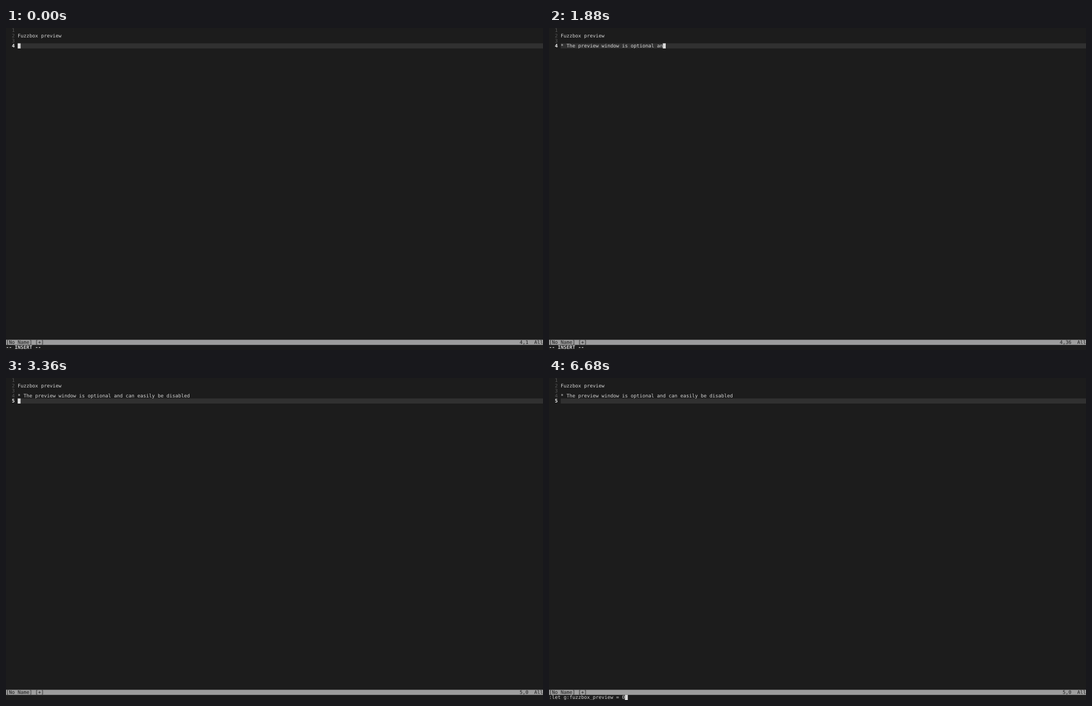
An HTML page for the animation above (8000 ms loop, 966 by 580 pixels).

```html
<!DOCTYPE html>
<html lang="en">
<head>
<meta charset="utf-8">
<title>Editor session</title>
<style>
  html, body { margin: 0; width: 100%; height: 100%; overflow: hidden; background: #1c1c1c; }
  svg { display: block; width: 966px; height: 580px; }
  text {
    font-family: "DejaVu Sans Mono", "Liberation Mono", monospace;
    font-size: 8.72px;
    white-space: pre;
    text-rendering: geometricPrecision;
    fill: #d4d4d4;
  }
  .num { fill: #585858; }
  .num.current { fill: #f0f0f0; font-weight: bold; }
  .status { fill: #1c1c1c; }
  .bold { font-weight: bold; }
</style>
</head>
<body>
<svg id="stage" viewBox="0 0 966 580"></svg>
<script>
const LOOP = 8000, TICK = 40;
const COLS = 184, ROWS = 63;
const CELL_W = 966 / COLS, CELL_H = 580 / ROWS;
const BASELINE = 7.4, GUTTER = 4;
const STATUS_ROW = ROWS - 2, COMMAND_ROW = ROWS - 1;

const SENTENCE = "* The preview window is optional and can easily be disabled";
const COMMAND = ":let g:fuzzbox_preview = 0";
const ENTER = 3200, ESCAPE = 3360, COLON = 5280;

// Typing pace: [time in ms, characters typed so far]
const SENTENCE_PACE = [[40, 1], [470, 9], [825, 16], [1350, 26], [1640, 31], [2350, 44], [3150, 59]];
const COMMAND_PACE = [[COLON, 1], [5360, 2], [6040, 15], [6120, 16], [6680, 26]];

const stage = document.getElementById("stage");

function add(tag, attrs) {
  const el = document.createElementNS("http://www.w3.org/2000/svg", tag);
  for (const key in attrs) el.setAttribute(key, attrs[key]);
  return stage.appendChild(el);
}

function place(el, col, row) {
  el.setAttribute("x", col * CELL_W);
  el.setAttribute("y", row * CELL_H);
}

function block(col, row, cols, fill) {
  return add("rect", {
    x: col * CELL_W, y: row * CELL_H,
    width: cols * CELL_W, height: CELL_H, fill
  });
}

function label(col, row, content, style = "") {
  const el = add("text", { x: col * CELL_W, y: row * CELL_H + BASELINE, class: style });
  el.textContent = content;
  return el;
}

function typed(pace, t) {
  if (t < pace[0][0]) return 0;
  for (let i = 1; i < pace.length; i++) {
    const [t0, n0] = pace[i - 1], [t1, n1] = pace[i];
    if (t < t1) return Math.floor(n0 + (n1 - n0) * (t - t0) / (t1 - t0) + 1e-6);
  }
  return pace[pace.length - 1][1];
}

add("rect", { width: 966, height: 580, fill: "#1c1c1c" });
const cursorLine = block(GUTTER, 3, COLS - GUTTER, "#303030");
block(0, STATUS_ROW, COLS, "#9e9e9e");
const cursor = block(GUTTER, 3, 1, "#dadada");

const numbers = [1, 2, 3, 4, 5].map((n, row) => label(2, row, n, "num"));
label(GUTTER, 1, "Fuzzbox preview");
const sentence = label(GUTTER, 3, "");
label(0, STATUS_ROW, "[No Name] [+]", "status");
const ruler = label(175, STATUS_ROW, "", "status");
label(181, STATUS_ROW, "All", "status");
const mode = label(0, COMMAND_ROW, "-- INSERT --", "bold");
const command = label(0, COMMAND_ROW, "");

function render(time) {
  const t = Math.floor(time / TICK) * TICK;
  const count = typed(SENTENCE_PACE, t);
  const keyed = typed(COMMAND_PACE, t);
  const inserting = t < ESCAPE;
  const row = t < ENTER ? 3 : 4;
  const col = row === 3 ? count : 0;

  sentence.textContent = SENTENCE.slice(0, count);
  command.textContent = COMMAND.slice(0, keyed);
  mode.style.display = inserting ? "" : "none";
  ruler.textContent = `${row + 1},${inserting ? col + 1 : 0}`.padStart(4);

  numbers.forEach((el, i) => el.classList.toggle("current", i === row));
  numbers[4].style.display = row === 4 ? "" : "none";
  place(cursorLine, GUTTER, row);
  if (keyed) place(cursor, keyed, COMMAND_ROW);
  else place(cursor, GUTTER + col, row);
}

const start = performance.now();
function loop() {
  render((performance.now() - start) % LOOP);
  requestAnimationFrame(loop);
}
loop();
</script>
</body>
</html>
```
